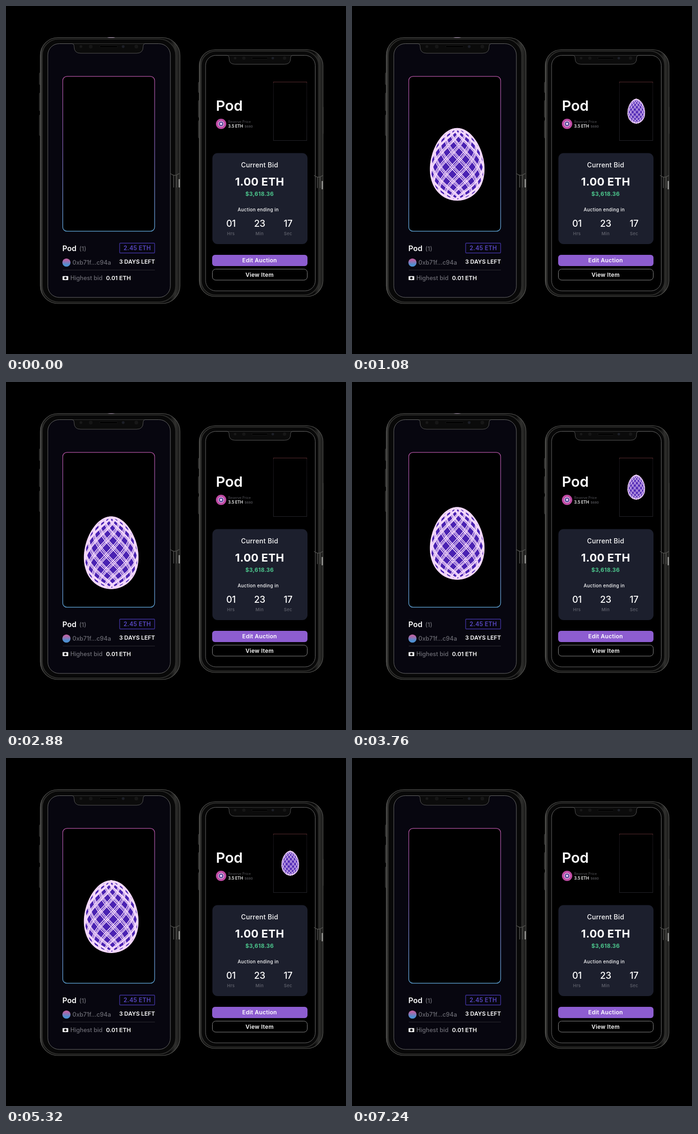
These frames come from a looping animation (724 by 744 pixels, 7.32 s). An HTML page:

```html
<!DOCTYPE html>
<html lang="en">
<head>
<meta charset="utf-8">
<title>Auction phones</title>
<style>
html, body { margin: 0; width: 100%; height: 100%; overflow: hidden; background: #000; }
svg { display: block; width: 724px; height: 744px; font-family: Inter, "Open Sans", sans-serif; font-weight: 600; fill: #fff; }
.dim { fill: #6c6c74; font-weight: 500; }
.mid { text-anchor: middle; letter-spacing: .3px; }
</style>
</head>
<body>
<svg viewBox="0 0 724 744">
  <defs>
    <linearGradient id="rim" x1="0" y1="0" x2="0" y2="1">
      <stop offset="0" stop-color="#a04a92"/><stop offset=".45" stop-color="#75549f"/><stop offset="1" stop-color="#5a9bcb"/>
    </linearGradient>
    <linearGradient id="ball" x1="0" y1="0" x2="0" y2="1">
      <stop offset=".2" stop-color="#b765a5"/><stop offset=".75" stop-color="#4f8fd0"/>
    </linearGradient>
    <linearGradient id="metal">
      <stop offset="0" stop-color="#4a4a48"/><stop offset=".018" stop-color="#1c1c1b"/><stop offset=".045" stop-color="#0a0a0a"/>
      <stop offset=".93" stop-color="#0a0a0a"/><stop offset=".965" stop-color="#30302e"/><stop offset="1" stop-color="#1a1a19"/>
    </linearGradient>
    <linearGradient id="thumb" x1="0" y1="0" x2="0" y2="1">
      <stop offset="0" stop-color="#5b2c2f"/><stop offset=".03" stop-color="#161318"/><stop offset="1" stop-color="#25252b"/>
    </linearGradient>
    <clipPath id="clipL"><rect x="7" y="67" width="434" height="420"/></clipPath>
    <clipPath id="clipR"><rect x="576" y="162" width="59" height="125"/></clipPath>
    <g id="oval">
      <path id="shell" fill="#4a22b2" stroke="#f4d8fb" stroke-width="2.4"/>
      <path id="threads" fill="none" stroke="#f4d8fb" stroke-width="1.7"/>
    </g>
  </defs>

  <g id="phones"></g>

  <!-- left screen -->
  <rect x="120.8" y="150.5" width="195.7" height="331" rx="9" fill="#000" stroke="url(#rim)" stroke-width="1.5"/>
  <text x="120" y="524" font-size="16">Pod</text>
  <text x="156" y="524" font-size="13" class="dim">(1)</text>
  <rect x="242" y="507" width="74.5" height="21" rx="1.5" fill="none" stroke="#4034a0" stroke-width="1.4"/>
  <text x="279.5" y="522.3" font-size="12.5" class="mid" style="fill:#5747c0">2.45 ETH</text>
  <circle cx="128.7" cy="548.5" r="8.7" fill="url(#ball)"/>
  <text x="141.5" y="553" font-size="12.7" class="dim">0xb71f...c94a</text>
  <text x="241" y="551" font-size="12.2">3 DAYS LEFT</text>
  <path d="M121 564.5H317" stroke="#2d2d33"/>
  <rect x="120.5" y="577.5" width="12" height="8.5" rx="1"/>
  <circle cx="126.5" cy="581.7" r="2.6" fill="#08070f"/>
  <text x="137" y="586" font-size="12.6" class="dim">Highest bid</text>
  <text x="213" y="586" font-size="12.4">0.01 ETH</text>

  <!-- right screen -->
  <rect x="569.5" y="162.5" width="71" height="125" fill="#000" stroke="url(#thumb)"/>
  <text x="447" y="224" font-size="30.5">Pod</text>
  <circle cx="458" cy="252" r="11" fill="#bf4aa4"/>
  <circle cx="458" cy="252" r="5.8" fill="#5d4a9c" stroke="#ecc0e4" stroke-width="1.2"/>
  <circle cx="458" cy="252" r="2.4" fill="#e8d4f3"/>
  <text x="473" y="250" font-size="7.3" style="fill:#45454a;font-weight:500">Reserve Price</text>
  <text x="473" y="260.3" font-size="8.4">3.5 ETH</text>
  <text x="508" y="260.3" font-size="6.8" style="fill:#505055">$680</text>
  <rect x="439.5" y="314.5" width="202.5" height="194.5" rx="11" fill="#1c1f2d"/>
  <g class="mid">
    <text x="540" y="345" font-size="14" font-weight="500">Current Bid</text>
    <text x="540" y="384" font-size="23.5" font-weight="700">1.00 ETH</text>
    <text x="540" y="405.7" font-size="11.8" font-weight="700" style="fill:#4cc58c">$3,618.36</text>
    <text x="537" y="439" font-size="9.9" font-weight="500">Auction ending in</text>
    <g id="clock"></g>
    <rect x="439" y="532" width="203" height="24" rx="6" fill="#8d5dd0"/>
    <text x="540" y="548.3" font-size="12">Edit Auction</text>
    <rect x="439.5" y="562.5" width="202" height="23.5" rx="7" fill="none" stroke="#8a8a8a"/>
    <text x="540" y="578.7" font-size="12">View Item</text>
  </g>

  <g id="left" clip-path="url(#clipL)"></g>
  <g clip-path="url(#clipR)"><use href="#oval" id="small"/></g>
</svg>
<script>
const $ = id => document.getElementById(id);
const LOOP = 7320, STEP = 40;

// Phone drawn from its outer box, screen box, notch and side buttons
function phone(o) {
  const { x, y, r, b, screen: [sx, sy, sr, sb], notch: [nl, nr, nb], radius: R, fill } = o;
  const inner = R * .64, w = r - x, cx = (nl + nr) / 2, k = (nr - nl) / 147, cy = (sy + nb) / 2 - 4 * k;
  const bar = (bx, [from, to], color) =>
    `<rect x="${bx}" y="${from}" width="3" height="${to - from}" rx="1.5" fill="#151515" stroke="${color}" stroke-width=".8"/>`;
  const dot = (dx, size, color) => `<circle cx="${cx + dx * k}" cy="${cy}" r="${size * k}" fill="${color}"/>`;
  const [jx, jy] = o.joint;
  return o.buttons.map(v => bar(x - 2, v, '#4c4c4a')).join('') +
    bar(r - 3, o.power, '#777775') +
    `<rect x="${x}" y="${y}" width="${w}" height="${b - y}" rx="${R}" fill="url(#metal)" stroke="#5c5c59" stroke-width="1.1"/>
     <rect x="${x + 4}" y="${y + 3}" width="${w - 13}" height="${b - y - 6}" rx="${R - 3}" fill="#080808" stroke="#2c2c2a" stroke-width="2.2"/>
     <rect x="${sx}" y="${sy}" width="${sr - sx}" height="${sb - sy}" rx="${inner}" fill="${fill}" stroke="#6b6b6b" stroke-width="1"/>
     <path d="M${nl - 4} ${sy}q4 1 4 5V${nb - 14 * k}q0 ${14 * k} ${14 * k} ${14 * k}H${nr - 14 * k}q${14 * k} 0 ${14 * k} ${-14 * k}V${sy + 5}q0 -4 4 -5"
       fill="#0b0b0b" stroke="#555" stroke-width="1"/>
     <rect x="${cx - 19 * k}" y="${cy - 2}" width="${38 * k}" height="4" rx="2" fill="#000" stroke="#222" stroke-width=".6"/>` +
    dot(-59, 3, '#191919') + dot(-38, 4, '#161616') + dot(31, 3, '#1d1f27') + dot(59, 4, '#171717') +
    `<path d="M${jx} ${jy}q5 4 9 4t10 -4M${jx + 7} ${jy + 4}v${26 * k}M${jx + 13} ${jy + 4}v${26 * k}" fill="none" stroke="#4e4e4b" stroke-width="1.6"/>
     <rect x="${r - 3}" y="${jy + 12}" width="3" height="18" rx="1" fill="#8b8b88"/>`;
}

$('phones').innerHTML = phone({
  x: 73, y: 67.5, r: 370.5, b: 636, radius: 38, screen: [89, 80.5, 350, 623], notch: [145, 292, 101], fill: '#07060f',
  buttons: [[143, 168], [186, 224], [233, 277]], power: [197, 263], joint: [350, 358]
}) + phone({
  x: 411.5, y: 93.5, r: 675, b: 621, radius: 34, screen: [425, 105.5, 658.5, 609], notch: [475, 606, 124.5], fill: '#000',
  buttons: [[163, 185], [202, 238], [245, 282]], power: [215, 274], joint: [656, 362]
});

$('clock').innerHTML = [['01', 'Hrs', 479], ['23', 'Min', 540], ['17', 'Sec', 600.5]].map(([n, label, x]) =>
  `<text x="${x}" y="472" font-size="19.5" font-weight="500" letter-spacing="-.3">${n}</text>
   <text x="${x}" y="490" font-size="9.2" style="fill:#5a5c67">${label}</text>`).join('');

// Oval: surface of revolution, top at 0 and height 155, wound with threads in both directions
const radius = a => 57 * Math.sin(a - .137 * Math.sin(a));
const height = a => 77.5 - 76.5 * Math.cos(a);
const N = 48;
const arc = f => Array.from({ length: N + 1 }, (_, i) => f(i / N * Math.PI));
const point = (x, y) => x.toFixed(1) + ' ' + y.toFixed(1);
const side = s => arc(a => point(s * radius(a), height(a)));
$('shell').setAttribute('d', 'M' + [...side(1), ...side(-1).reverse()].join('L') + 'Z');

let d = '';
for (const dir of [1, -1])
  for (let group = 0; group < 12; group++)
    for (const gap of [0, .09, .16]) {
      let pen = 'M';
      arc(a => {
        const turn = group * Math.PI / 6 + gap + dir * (a * 1.25 + .3);
        if (Math.cos(turn) < -.05) { pen = 'M'; return; }
        d += pen + point(radius(a) * Math.sin(turn), height(a));
        pen = 'L';
      });
    }
$('threads').setAttribute('d', d);

// Value between [time, value] keys
function tween(t, keys, ease = u => u) {
  if (t <= keys[0][0]) return keys[0][1];
  for (let i = 1; i < keys.length; i++) {
    const [t0, v0] = keys[i - 1], [t1, v1] = keys[i];
    if (t < t1) return v0 + (v1 - v0) * ease((t - t0) / (t1 - t0));
  }
  return keys[keys.length - 1][1];
}
const sine = u => .5 - .5 * Math.cos(Math.PI * u);

// Each visit: time of the lowest point after the fall, time of leaving
const visits = [[700, 2200], [2765, 4410], [4975, 6360]];
const bounce = [[-400, -355], [0, 27], [380, -6.5], [600, 0]];
$('left').innerHTML = '<use href="#oval"/>'.repeat(visits.length);
const ovals = [...$('left').children];

const slide = [[98, -48], [104, -46.5], [528, -21], [825, 0], [1253, 0], [1400, 59]];

function draw(now) {
  const t = Math.floor(now % LOOP / STEP) * STEP;
  visits.forEach(([low, leave], i) => {
    const out = Math.max(0, t - leave);
    const x = 224 - .0032 * out * out, y = 267.5 + tween(t - low, bounce, sine);
    ovals[i].setAttribute('transform', `translate(${x} ${y})`);
  });
  const x = 605.3 + tween(t % (LOOP / 5), slide);
  $('small').setAttribute('transform', `translate(${x} 198.8) scale(.32 .337)`);
}

const start = performance.now();
function frame() {
  draw(performance.now() - start);
  requestAnimationFrame(frame);
}
frame();
</script>
</body>
</html>
```
